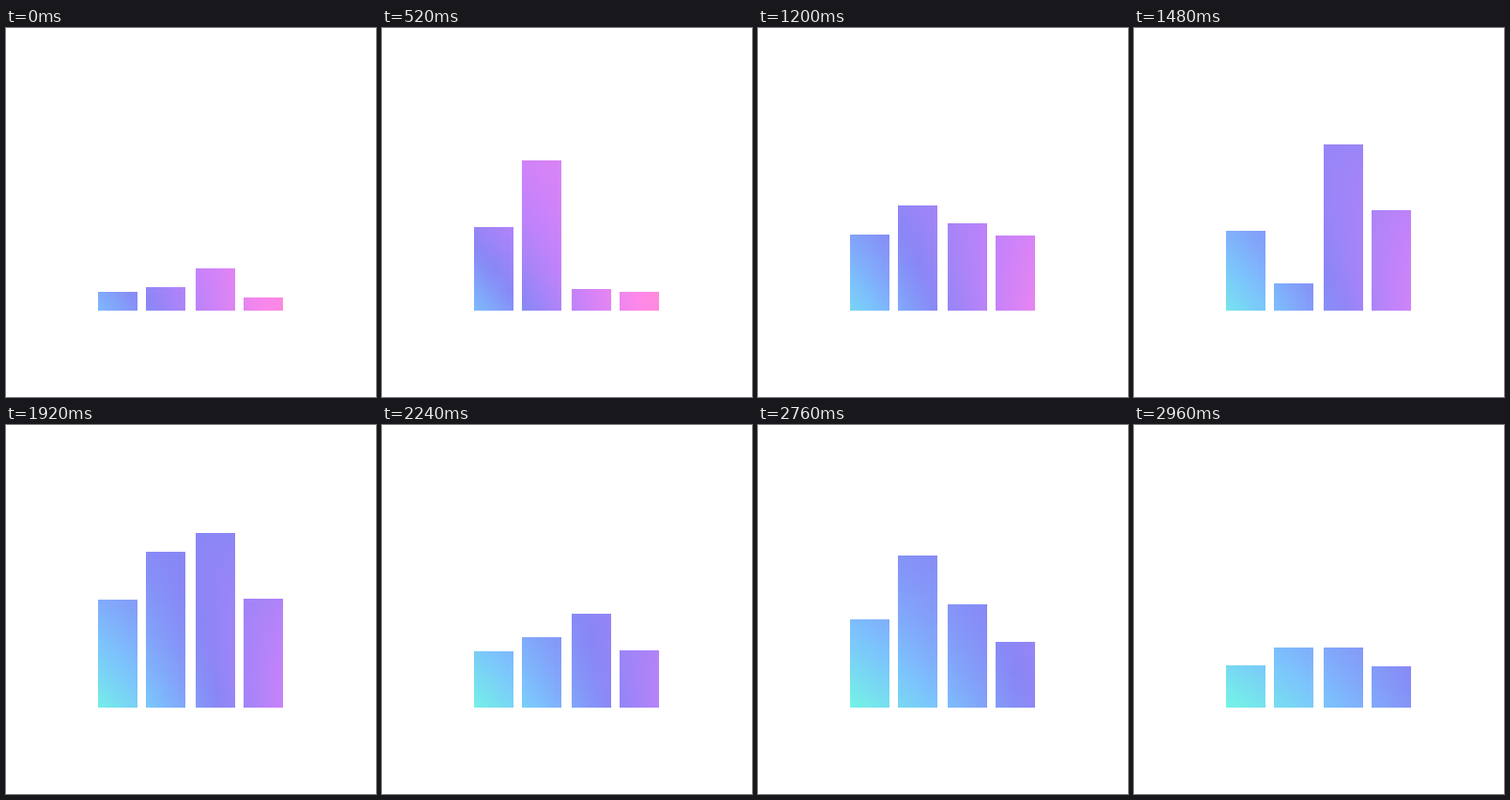
An HTML page with a canvas that plays this animation: 394 px wide and 393 px high, repeating every 3 s.

```html
<!DOCTYPE html>
<html lang="en">
<head>
<meta charset="utf-8">
<title>Bars</title>
<style>
html, body { margin: 0; width: 100%; height: 100%; overflow: hidden; background: #fff; }
canvas { display: block; width: 100vw; height: 100vh; }
</style>
</head>
<body>
<canvas id="stage" width="394" height="393"></canvas>
<script>
const ctx = document.getElementById('stage').getContext('2d');
const LOOP = 3000, STEP = 40, BASE = 301, WIDTH = 42, LEFT = 98;

// Each bar: left edge and [time, height] keys.
const bars = [
  { x: 98, keys: [[0, 20], [260, 75], [520, 89], [840, 22], [1150, 80], [1480, 85], [1700, 55],
    [1920, 115], [2220, 60], [2520, 56], [2780, 95], [2960, 45]] },
  { x: 149, keys: [[0, 25], [280, 95], [520, 160], [580, 175], [840, 34], [1140, 120], [1480, 29],
    [1920, 166], [2240, 75], [2520, 64], [2800, 168], [2960, 64]] },
  { x: 202, keys: [[0, 45], [240, 179], [520, 23], [840, 42], [1120, 105], [1280, 80], [1480, 177],
    [1510, 179], [1720, 100], [1920, 186], [1960, 196], [2240, 100], [2490, 179], [2520, 173],
    [2760, 110], [2960, 64]] },
  { x: 253, keys: [[0, 14], [260, 75], [520, 20], [840, 55], [1100, 100], [1300, 60], [1480, 107],
    [1700, 65], [1920, 116], [2220, 60], [2520, 105], [2760, 70], [2960, 44]] }
];

// Colour field keys: time, ramp value at lower left, slope along x, value at the top.
const field = [
  [0, 1.15, 0.0155, 3.0],
  [520, 1.1, 0.0165, 3.3],
  [840, 1.0, 0.0158, 2.6],
  [1480, 0.3, 0.0145, 2.2],
  [1920, 0.1, 0.0148, 2.0],
  [2520, 0, 0.0125, 1.95],
  [2960, -0.05, 0.0093, 1.95]
];

const ramp = ['74f3e6', '7cc2fd', '8886f6', 'c882fa', 'ff88ea', 'ff90c0']
  .map(hex => [0, 2, 4].map(i => parseInt(hex.slice(i, i + 2), 16)));

const mix = (a, b, k) => a + (b - a) * k;
const clamp = (v, lo, hi) => Math.min(hi, Math.max(lo, v));

function findKey(keys, t) {
  let i = 0;
  while (i < keys.length - 2 && t >= keys[i + 1][0]) i++;
  return i;
}

function slope(keys, i) {
  const rate = j => (keys[j + 1][1] - keys[j][1]) / (keys[j + 1][0] - keys[j][0]);
  if (i === 0 || i === keys.length - 1) return 0;
  const a = rate(i - 1), b = rate(i);
  return a * b <= 0 ? 0 : 2 * a * b / (a + b);
}

// Monotone cubic curve through the keys.
function curve(keys, t) {
  const i = findKey(keys, t);
  const [t0, v0] = keys[i], [t1, v1] = keys[i + 1];
  const d = t1 - t0, k = clamp((t - t0) / d, 0, 1), r = 1 - k;
  return v0 * (1 + 2 * k) * r * r + slope(keys, i) * d * k * r * r
    + v1 * k * k * (3 - 2 * k) - slope(keys, i + 1) * d * k * k * r;
}

function fieldAt(t) {
  const i = findKey(field, t), a = field[i], b = field[i + 1];
  const k = clamp((t - a[0]) / (b[0] - a[0]), 0, 1);
  return [1, 2, 3].map(j => mix(a[j], b[j], k));
}

function color(p) {
  p = clamp(p, 0, ramp.length - 1);
  const i = Math.min(Math.floor(p), ramp.length - 2);
  return `rgb(${ramp[i].map((c, j) => Math.round(mix(c, ramp[i + 1][j], p - i))).join(',')})`;
}

function drawBar(x, height, [start, across, top]) {
  const value = (px, h) => mix(start + across * (px - LEFT) + 0.004 * h, top, clamp(h / 200, 0, 1));
  for (let h = 0; h < height; h += 2) {
    const row = Math.min(2, height - h);
    const fill = ctx.createLinearGradient(x, 0, x + WIDTH, 0);
    for (const k of [0, 0.5, 1]) fill.addColorStop(k, color(value(x + WIDTH * k, h)));
    ctx.fillStyle = fill;
    ctx.fillRect(x, BASE - h - row, WIDTH, row);
  }
}

function draw(now) {
  const t = Math.floor((now % LOOP) / STEP) * STEP;
  const shade = fieldAt(t);
  ctx.fillStyle = '#fff';
  ctx.fillRect(0, 0, 394, 393);
  for (const { x, keys } of bars) drawBar(x, Math.round(curve(keys, t)), shade);
}

const begin = performance.now();
function tick() {
  draw(performance.now() - begin);
  requestAnimationFrame(tick);
}
tick();
</script>
</body>
</html>
```
